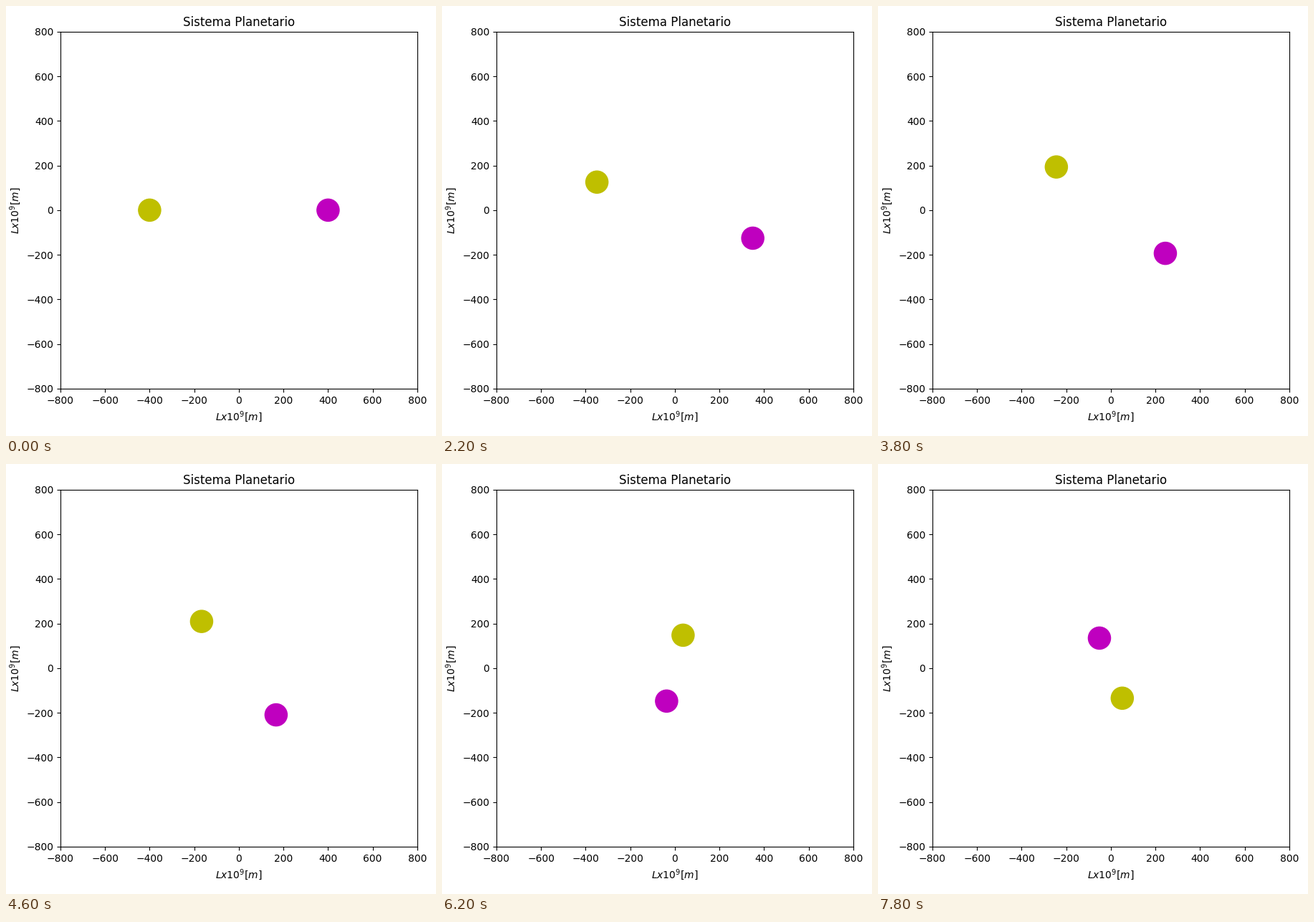
A matplotlib script that plays this animation: 600x600 px, repeating every 8 s.

```python
import math

import matplotlib.pyplot as plt
from matplotlib.animation import FuncAnimation
from matplotlib.patches import Circle

SIZE, DPI = 600, 100
FRAMES, INTERVAL = 40, 200
LIMIT = 800
LEFT, BOTTOM, SIDE = 75.9, 66.15, 498  # axes box in pixels

# Kepler ellipse, starting at the far point
FAR, NEAR = 400.0, 110.5
A = (FAR + NEAR) / 2
ECC = (FAR - NEAR) / (FAR + NEAR)
B = A * math.sqrt(1 - ECC ** 2)
RATE = 0.08907  # mean anomaly per frame


def orbit(i):
    mean = RATE * i
    e = mean
    for _ in range(30):
        e -= (e + ECC * math.sin(e) - mean) / (1 + ECC * math.cos(e))
    return -A * (math.cos(e) + ECC), B * math.sin(e)


plt.rcParams["font.family"] = "DejaVu Sans"
fig = plt.figure(figsize=(SIZE / DPI, SIZE / DPI), dpi=DPI)
ax = fig.add_axes([LEFT / SIZE, BOTTOM / SIZE, SIDE / SIZE, SIDE / SIZE])
ax.set_xlim(-LIMIT, LIMIT)
ax.set_ylim(-LIMIT, LIMIT)
ticks = range(-LIMIT, LIMIT + 1, 200)
ax.set_xticks(ticks)
ax.set_yticks(ticks)
ax.set_title("Sistema Planetario")
ax.set_xlabel("$Lx10^{9}[m]$")
ax.set_ylabel("$Lx10^{9}[m]$")

star = ax.add_patch(Circle((-FAR, 0), 50, color="y"))
planet = ax.add_patch(Circle((FAR, 0), 50, color="m"))


def update(i):
    x, y = orbit(i)
    star.center = x, y
    planet.center = -x, -y
    return star, planet


anim = FuncAnimation(fig, update, frames=FRAMES, interval=INTERVAL,
                     repeat=True, repeat_delay=0)
plt.show()
```
